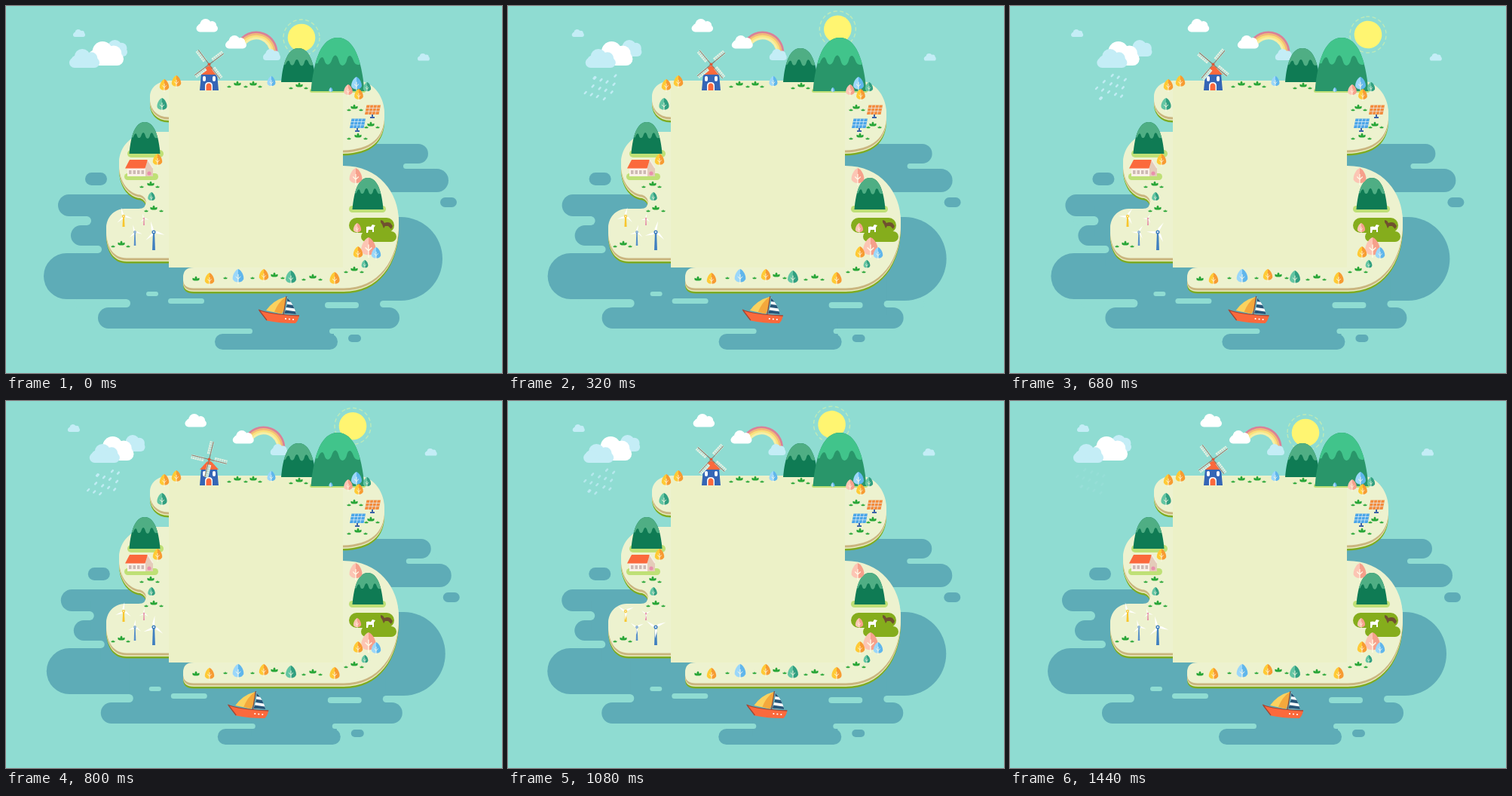
Animation, 658 px wide and 487 px high, one loop 1480 ms. Source, as an HTML page with a canvas:

```html
<!DOCTYPE html>
<html lang="en">
<head>
<meta charset="utf-8">
<title>Island</title>
<style>
html, body { margin: 0; width: 100%; height: 100%; overflow: hidden; background: #8fdcd2; }
canvas { display: block; }
</style>
</head>
<body>
<canvas id="stage" width="658" height="487"></canvas>
<script>
const g = document.getElementById('stage').getContext('2d');
const LOOP = 1480, STEP = 40, TURN = 620, END = 1440;
const BG = '#8fdcd2', SEA = '#5eacb7', CREAM = '#edf2cf', ICE = '#c4edf6', LIME = '#bfe076', ORANGE = '#fb693c';
const FOLIAGE = {
  o: ['#ffca36', '#f79b32'], g: ['#63c5a3', '#319f80'],
  b: ['#9bd7fa', '#60b6ec'], p: ['#fcc5b4', '#f6a08b']
};

// --- helpers ---
function shape(d, fill) { g.fillStyle = fill; g.fill(new Path2D(d)); }
function stroke(d, color, width = 1) {
  g.strokeStyle = color; g.lineWidth = width; g.stroke(new Path2D(d));
}
function pill(x, y, x2, y2, fill) {
  g.fillStyle = fill; g.beginPath();
  g.roundRect(x, y, x2 - x, y2 - y, Math.min(x2 - x, y2 - y) / 2); g.fill();
}
function rect(x, y, w, h, fill) { g.fillStyle = fill; g.fillRect(x, y, w, h); }
function disc(x, y, r, fill) { g.fillStyle = fill; g.beginPath(); g.arc(x, y, r, 0, 7); g.fill(); }
function at(x, y, draw, angle = 0) {
  g.save(); g.translate(x, y); g.rotate(angle); draw(); g.restore();
}
const TIMES = [0, 200, 480, 600, 680, 920, 1200, END, LOOP];
function track(t, values) {
  const i = Math.max(0, TIMES.findIndex(k => k > t) - 1);
  return values[i] + (values[i + 1] - values[i]) * (t - TIMES[i]) / (TIMES[i + 1] - TIMES[i]);
}

// --- water and sky ---
function sea() {
  rect(440, 190, 90, 40, SEA);
  pill(400, 183, 560, 209, SEA);
  pill(400, 216, 587, 247, SEA);
  pill(440, 280, 579, 391, SEA);
  pill(69, 250, 260, 279, SEA);
  pill(86, 291, 260, 318, SEA);
  pill(50, 328, 330, 389, SEA);
  pill(122, 400, 522, 428, SEA);
  pill(277, 435, 440, 456, SEA);
  rect(108, 265, 110, 40, SEA);
  rect(122, 305, 100, 40, SEA);
  rect(160, 345, 340, 65, SEA);
  rect(322, 420, 113, 25, SEA);
  pill(527, 209, 570, 216, BG);
  pill(80, 279, 113, 291, BG);
  pill(90, 318, 127, 328, BG);
  pill(90, 389, 165, 400, BG);
  pill(496, 391, 550, 400, BG);
  pill(285, 428, 327, 435, BG);
  pill(429, 428, 470, 435, BG);
  pill(186, 379, 202, 385, BG);
  pill(215, 388, 263, 395, BG);
  pill(423, 393, 468, 401, BG);
  pill(105, 221, 134, 238, SEA);
  pill(576, 254, 598, 267, SEA);
  pill(454, 436, 471, 446, SEA);
}
function cloud(x, y, w, h, fill = ICE) {
  pill(x, y + h * .46, x + w, y + h, fill);
  disc(x + w * .43, y + h * .42, h * .42, fill);
  disc(x + w * .24, y + h * .64, h * .3, fill);
  disc(x + w * .73, y + h * .5, h * .33, fill);
}
function rain(t, x) {
  g.save();
  g.globalAlpha = Math.max(0, Math.min(1, t / 160, 1 - (t - 960) / 560)) * .9;
  g.lineCap = 'round';
  for (let i = 0; i < 14; i++) {
    const fall = (i * 13.7 + t * .075) % 33;
    stroke(`M${x + (i * 8.9) % 36 - fall * .2} ${90 + fall}l-1.8 2`, ICE, 2.5);
  }
  g.restore();
}
function rainbow() {
  ['#d98198', '#f3b978', '#fbe27c', '#f6efa6'].forEach((color, i) => {
    g.strokeStyle = color; g.lineWidth = 3;
    g.beginPath(); g.arc(332, 62, 27 - i * 2.6, Math.PI * 1.12, Math.PI * 2); g.stroke();
  });
}
function sun(dx, angle) {
  at(392 + dx, 42 - .488 * dx + .0053 * dx * dx, () => {
    disc(0, 0, 18.3, '#fff571');
    g.setLineDash([5, 3.4]);
    stroke('M24 0A24 24 0 1 1 -24 0A24 24 0 1 1 24 0', '#bdeab8', 1.4);
  }, angle);
}

// --- land ---
const LAND = new Path2D(
  'M216 145C199 145 191 133 191 121C191 107 202 99 220 99H466C490 101 502 122 502 143C502 172 484 188 447 189Z' +
  'M216 167H192C166 169 150 187 150 208C150 232 164 247 178 248Q186 251 186 259Q186 269 176 269H157' +
  'C142 270 133 281 133 295C133 318 143 332 160 332H216Z' +
  'M447 212C495 212 521 248 521 285C521 335 494 372 448 372H249Q235 372 235 360Q235 347 249 347H447Z');
function island() {
  for (const [dy, color] of [[9.5, '#7fab22'], [7, '#e9eebf'], [5.5, '#cab57f'], [2.5, CREAM], [0, CREAM]])
    at(0, dy, () => { g.fillStyle = color; g.fill(LAND); });
}
function mountain(x, top, base, w, body, cap) {
  at(x, top, () => {
    const h = base - top, r = w / 2;
    const dome = new Path2D(`M${-r} ${h}C${-r * .9} ${h * .4} ${-r * .6} 0 0 0S${r * .9} ${h * .4} ${r} ${h}Z`);
    g.fillStyle = body; g.fill(dome);
    g.clip(dome);
    g.scale(r, h);
    shape('M-1 0H1V.4C.85 .54 .66 .54 .58 .42S.38 .32 .34 .42S.12 .58 .04 .43S-.16 .32 -.22 .42S-.44 .54 -.5 .42S-.7 .4 -.74 .48L-1 .5Z', cap);
  });
}
function tree(x, base, h, kind) {
  const [light, dark] = FOLIAGE[kind], r = h * .36;
  at(x, base, () => {
    const side = s => `M0 ${-h}C${s * r * .6} ${-h * .93} ${s * r * 1.1} ${-h * .55} ${s * r} ${-h * .34}Q${s * r * .8} ${-h * .13} 0 ${-h * .13}Z`;
    shape(side(-1), light);
    shape(side(1), dark);
    stroke(`M0 0V${-h * .65}M${-r * .45} ${-h * .5}L0 ${-h * .34}L${r * .45} ${-h * .5}`, '#fffbe8', h / 20);
  });
}
function grass(x, y, s) {
  at(x, y, () => {
    g.scale(s, s);
    shape('M-5 2Q-6 -1 -5 -1.5Q-3 -1 -2 0Q-2 -3 0 -4Q2 -3 2 0Q3 -1 5 -1.5Q6 -1 5 2Q0 4 -5 2Z', '#27a536');
  });
}
function panel(x, y, fill) {
  at(x, y, () => {
    stroke('M10 12V16.5M7 17H13', '#3d63a8', 2);
    shape('M2.5 .5H21L18.5 13H0Z', fill);
    stroke('M1.7 4.5H20M.8 8.8H19.3M7 .5L4.6 13M11.7 .5L9.2 13M16.4 .5L13.8 13', '#e8f3f5', .7);
  });
}
function house() {
  pill(157, 222, 202, 231, LIME);
  rect(161, 214, 25, 12, '#fbf0e8');
  shape('M188 205L195 215V226H185V214Z', '#e4cbb9');
  shape('M164 204H188L184.5 215.5H158Z', ORANGE);
  stroke('M188 204L195 215', '#f7ede2', 1.5);
  for (let x = 163; x < 184; x += 5.5) rect(x, 218, 3.5, 5, '#cdb9b4');
  disc(190, 222, 2.6, '#e990ac');
}
function field() {
  pill(455, 281, 515, 301, '#85ad1c');
  pill(471, 299, 518, 313, '#85ad1c');
  rect(475, 292, 34, 12, '#85ad1c');
  shape('M478 293Q481 292 484 293L486 290L490 291L488 294V300H486V297H481L480 301H478Z', '#fff');
  shape('M497 284L500 285L502 288Q506 286 510 288L513 292L511 296L507 292H503L501 295L499 290L497 287Z', '#70502f');
}
function turbine(x, y, base, r, color, angle) {
  shape(`M${x - r * .07} ${y}h${r * .14}L${x + r * .13} ${base}H${x - r * .13}Z`, color);
  for (let i = 0; i < 3; i++)
    at(x, y, () => shape(`M0 0L${r * .3} ${-r * .15}L${r} 0L${r * .3} ${r * .05}Z`, '#fff'), angle + i * Math.PI * 2 / 3);
  disc(x, y, r * .17, color);
  disc(x, y, r * .07, '#fff');
}
function windmill(angle) {
  shape('M259 90H280L282 112H257Z', '#3566b6');
  shape('M257 91L266 81Q270 78 273 81L282 91Z', ORANGE);
  pill(261, 93, 265, 100, '#fff');
  pill(274, 93, 278, 100, '#fff');
  shape('M264 112V106Q264 101 269 101Q274 101 274 106V112Z', '#fff');
  shape('M265.5 112V106Q266 102.5 269 102.5Q272 102.5 272.5 106V112Z', ORANGE);
  for (let i = 0; i < 4; i++)
    at(269.5, 77.5, () => {
      rect(7, -4.5, 17, 5.5, '#e4f4e5');
      stroke('M10 -4.5V1M13 -4.5V1M16 -4.5V1M19 -4.5V1M22 -4.5V1M7 -2H24', '#9fd3cc', .7);
      stroke('M0 0H24', '#8a7b6c', 1.1);
    }, angle + i * Math.PI / 2);
  disc(269.5, 77.5, 2, '#d75a3a');
}
function boat() {
  shape('M371 386Q355 390 345 404L366 408.5Q372 397 371 386Z', '#fbd25f');
  shape('M371 386Q361 393 356 406L366 408.5Q372 397 371 386Z', '#f4a83c');
  g.save();
  g.clip(new Path2D('M373 387Q382 396 385 409L369 408Q374 397 373 387Z'));
  at(368, 385, () => {
    rect(-5, -5, 30, 35, '#fff');
    for (let y = 2; y < 28; y += 8) rect(-5, y, 30, 4.3, '#275679');
  }, .14);
  g.restore();
  stroke('M372 385L368 410', '#8d4638', 1.2);
  shape('M335 403Q348 409 389 411Q388 417 384 421Q363 421 346 417.5Q342 411 335 403Z', ORANGE);
  stroke('M335 403Q348 409 389 411M336 404L346 417', '#a34635', 1.3);
  for (const x of [371, 376, 381]) disc(x, 415 + (x - 371) / 10, 1.1, '#fff');
}

const TREES = [
  [210, 114, 17, 'o'], [226, 109, 17, 'o'], [207, 140, 18, 'g'], [352, 108, 15, 'b'], [431, 115, 7, 'b'],
  [465, 113, 19, 'b'], [454, 120, 16, 'p'], [468, 126, 16, 'o'], [479, 115, 14, 'g'], [201, 213, 17, 'o'],
  [193, 260, 13, 'g'], [464, 238, 23, 'p'], [466, 302, 14, 'p'], [481, 334, 27, 'p'], [467, 336, 17, 'o'],
  [491, 337, 17, 'b'], [476, 349, 12, 'g'], [270, 371, 17, 'o'], [308, 369, 20, 'b'], [342, 366, 17, 'o'],
  [378, 370, 19, 'g'], [436, 371, 18, 'o']
];
// Each tuft has small companions at the listed sides.
const TUFTS = [
  [307, 103, -11, 11], [328, 103, 9], [389, 105, -11, 9], [462, 134, -7, 9], [484, 157, -6, 9],
  [467, 172, -12, 10], [192, 236, -12, 9], [196, 268, -10, 10], [153, 315, -11, 9], [252, 362],
  [356, 357, -65, -29, 11], [407, 359, -12, 10], [462, 349, -11, 10]
];

function draw(t) {
  const half = t < TURN ? t / TURN : 1 + Math.min(1, (t - TURN) / (END - TURN));
  const spin = -Math.PI * half, sway = (1 - Math.cos(spin)) / 2;
  const drift = track(t, [0, .37, .875, 1, .98, .7, .36, 0, 0]);
  const slide = (d, fn) => at(d, 0, fn);

  rect(0, 0, 658, 487, BG);
  slide(4.5 * drift, sea);
  slide(-8 * sway, () => cloud(89, 31, 16, 10));
  slide(11 * sway, () => cloud(546, 63, 16, 9.5));
  slide(-17 * sway, () => cloud(252.5, 17, 28.5, 17.5, '#fff'));
  slide(11 * sway, () => {
    rainbow();
    cloud(291, 39, 28, 17.5, '#fff');
    cloud(341, 57, 23, 15);
  });
  rain(t, 92 + 28 * drift);
  slide(28 * drift, () => cloud(132, 45, 29, 22));
  slide(16 * drift, () => cloud(107, 47, 49, 32, '#fff'));
  slide(32 * drift, () => cloud(84, 57, 40, 25));
  sun(track(t, [0, 28, 68.5, 85, 83, 53, 26, 0, 0]), spin / 2);

  island();
  rect(216, 100, 231, 247, '#ecf1c7');
  mountain(388, 56, 101, 46, '#0f7b54', '#4fae84');
  pill(403, 110, 477, 115, LIME);
  mountain(440, 42, 113, 71, '#29966a', '#41c48b');
  pill(161, 191, 209, 201, LIME);
  mountain(184, 154, 196, 41, '#0f7b54', '#4fae84');
  pill(455, 265, 504, 274, LIME);
  mountain(480, 228, 270, 41, '#0f7b54', '#4fae84');
  field();
  for (const [x, y, ...sides] of TUFTS) {
    grass(x, y, .85);
    for (const dx of sides) grass(x + dx, y + 4, .45);
  }
  for (const item of TREES) tree(...item);
  house();
  panel(476, 131, '#f38b3c');
  panel(456, 149, '#4ba5e8');
  const blades = .26 + spin;
  turbine(156, 279, 293, 12, '#f8c62d', blades);
  turbine(183, 282, 291, 7, '#e58aa9', blades);
  turbine(171, 300, 318, 10, '#5a91c9', blades);
  turbine(196, 300, 324, 15, '#3f7fc0', blades);
  windmill(.93 + spin);
  slide(-46 * sway, boat);
}

function frame(now) {
  draw(Math.floor(now % LOOP / STEP) * STEP);
  requestAnimationFrame(frame);
}
frame(0);
</script>
</body>
</html>
```
